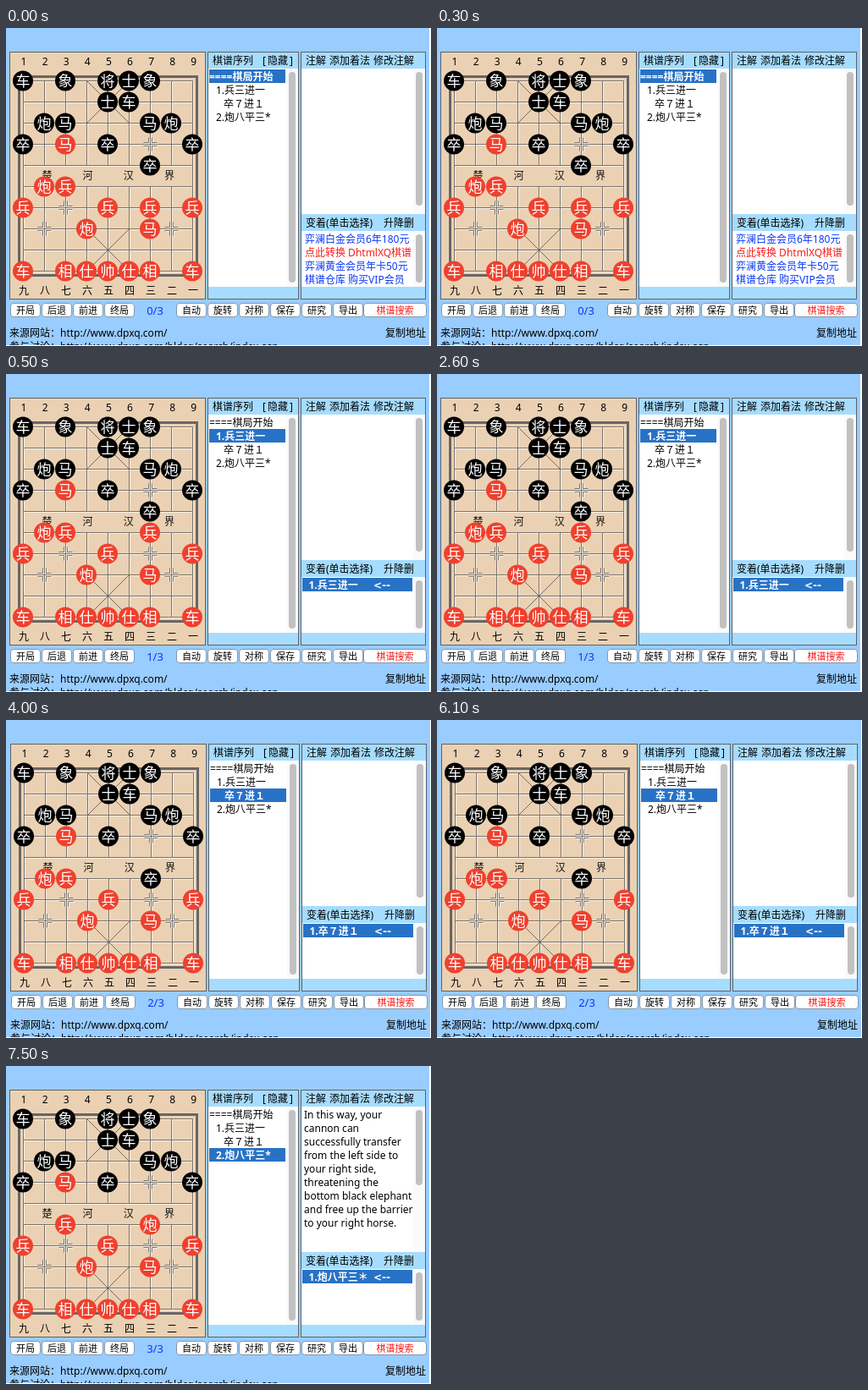
These frames come from a looping animation (502x376 px, 8 s). An HTML page:

```html
<!DOCTYPE html>
<html lang="zh-CN">
<head>
<meta charset="utf-8">
<title>象棋棋谱</title>
<style>
html, body { margin: 0; width: 100%; height: 100%; overflow: hidden; background: #fff; }
svg { display: block; width: 502px; height: 376px; }
text { font: 12px "Noto Sans", "Noto Sans CJK SC", "Noto Sans CJK", sans-serif; white-space: pre; }
.mid { text-anchor: middle; }
.bold { font-weight: bold; }
.arrow { font-family: "DejaVu Sans", sans-serif; font-weight: bold; }
.small { font-size: 11px; }
.count { font-size: 13px; }
.glyph { font-size: 17px; }
.state { visibility: hidden; animation: 8s step-end infinite; }
#s0 { animation-name: start; }
#s1 { animation-name: first; }
#s2 { animation-name: second; }
#s3 { animation-name: third; }
#scene { animation: nudge 8s step-end infinite; }
@keyframes start { 0% { visibility: visible } 6.25%, 100% { visibility: hidden } }
@keyframes first { 0% { visibility: hidden } 6.25% { visibility: visible } 50%, 100% { visibility: hidden } }
@keyframes second { 0% { visibility: hidden } 50% { visibility: visible } 93.75%, 100% { visibility: hidden } }
@keyframes third { 0% { visibility: hidden } 93.75%, 100% { visibility: visible } }
@keyframes nudge { 0% { transform: none } 50% { transform: translateX(1px) } 93.75%, 100% { transform: none } }
</style>
</head>
<body>
<svg viewBox="0 0 502 376"><g id="scene"></g><rect y="375" width="502" height="1" fill="#fff"/></svg>
<script>
const RED = '#f0402e', BLACK = '#000', BLUE = '#0838fa', LINK_RED = '#f81a1a';
const PICK = '#2872c6', HEAD = '#a6dcff', EDGE = '#5c6268';

const rect = (x, y, w, h, fill, extra = '') =>
  `<rect x="${x}" y="${y}" width="${w}" height="${h}" fill="${fill}" ${extra}/>`;
const text = (x, y, str, fill = BLACK, cls = '') =>
  `<text x="${x}" y="${y}" fill="${fill}" class="${cls}">${str.replace(/</g, '&lt;')}</text>`;
const path = (d, stroke) => `<path d="${d}" fill="none" stroke="${stroke}"/>`;
const panel = (x, w, fill) => rect(x + .5, 28.5, w - 1, 292, fill, `stroke="${EDGE}"`);
const colX = c => 20 + 25 * c;
const rowY = r => 62.5 + 25 * r;

// Each piece is written as glyph, column, row.
const pieces = (list, fill) => list.split(' ').map(([name, c, r]) =>
  `<circle cx="${colX(+c)}" cy="${rowY(+r)}" r="12" fill="${fill}"/>` +
  text(colX(+c), rowY(+r) + 6, name, '#fff', 'mid glyph')).join('');

function gridPath() {
  let d = '';
  for (let r = 0; r < 10; r++) d += `M20.5 ${rowY(r)}H220.5`;
  for (let c = 0; c < 9; c++) {
    d += c % 8 ? `M${colX(c) + .5} 62.5V162.5M${colX(c) + .5} 187.5V287.5` : `M${colX(c) + .5} 62.5V287.5`;
  }
  return d;
}

function starPath() {
  let d = '';
  const star = (c, r) => {
    for (const sx of [-1, 1]) {
      if (c + sx < 0 || c + sx > 8) continue;
      for (const sy of [-1, 1])
        d += `M${colX(c) + .5 + 2 * sx} ${rowY(r) + 8 * sy}v${-6 * sy}h${6 * sx}`;
    }
  };
  for (const r of [2, 7]) { star(1, r); star(7, r); }
  for (const r of [3, 6]) for (let c = 0; c < 9; c += 2) star(c, r);
  return d;
}

function board() {
  const grid = gridPath(), stars = starPath();
  const palace = 'M95.5 62.5l50 50m0-50l-50 50M95.5 237.5l50 50m0-50l-50 50';
  let out = panel(4, 232, '#ebd1b3');
  out += rect(15.5, 57.5, 210, 235, 'none', 'stroke="#666" stroke-width="3"');
  out += `<g transform="translate(1 1)">${path(grid + stars, '#fbf1e4')}</g>`;
  out += path(grid + stars, '#77736e') + path(palace, '#706b66');
  [...'楚河汉界'].forEach((s, i) => out += text(48.4 + 48.2 * i, 179, s, '#111', 'mid'));
  [...'九八七六五四三二一'].forEach((s, i) => {
    out += text(21 + 25.1 * i, 44, String(i + 1), BLACK, 'mid') + text(21 + 25 * i, 315, s, BLACK, 'mid');
  });
  out += pieces('车00 象20 将40 士50 象60 士41 车51 炮12 马22 马62 炮72 卒03 卒43 卒83', BLACK);
  return out + pieces('马23 兵25 兵06 兵46 兵86 炮37 马67 车09 相29 仕39 帅49 仕59 相69 车89', RED);
}

const track = (x, y, h) => rect(x, y, 14, h, '#fafafa');
const thumb = (x, y, h) => rect(x, y, 8, h, '#c1c1c1', 'rx="4"');

function sidePanels() {
  return panel(238, 108, HEAD) + rect(239, 48, 106, 258, '#fff') + track(331, 48, 258) + thumb(334, 52, 249) +
    text(244, 43, '棋谱序列') + text(303, 43, '[') + text(309, 43, '隐藏') + text(335, 43, ']') +
    panel(348, 148, HEAD) + rect(349, 48, 146, 172, '#fff') + track(481, 48, 172) +
    rect(349, 240, 146, 66, '#fff') + track(481, 240, 66) + thumb(484, 244, 57) +
    text(354, 43, '注解') + text(382, 43, '添加着法') + text(434, 43, '修改注解') +
    text(354, 235, '变着(单击选择)') + text(446, 235, '升降删');
}

function footer() {
  const button = (x, w, label, fill) =>
    rect(x + .5, 325.5, w - 1, 16, '#fff', 'rx="3.5" stroke="#8398ae"') +
    text(x + w / 2, 338, label, fill, 'mid small');
  let out = '';
  ['开局', '后退', '前进', '终局'].forEach((s, i) => out += button(5 + 37 * i, 36, s));
  ['自动', '旋转', '对称', '保存', '研究', '导出'].forEach((s, i) => out += button(201 + 37 * i, 36, s));
  return out + button(422, 75, '棋谱搜索', LINK_RED) +
    text(4, 365, '来源网站：') + text(64, 365, 'http://www.dpxq.com/') + text(448, 365, '复制地址') +
    text(4, 381, '参与讨论：') + text(64, 381, 'http://www.dpxq.com/hldcg/search/index.asp');
}

const moves = [[240, '====棋局开始'], [248, '1.兵三进一'], [257, '卒７进１'], [248, '2.炮八平三*']];
const links = ['弈澜白金会员6年180元', '点此转换 DhtmlXQ棋谱', '弈澜黄金会员年卡50元', '棋谱仓库 购买VIP会员'];
const note = ['In this way, your', 'cannon can', 'successfully transfer', 'from the left side to', 'your right side,',
  'threatening the', 'bottom black elephant', 'and free up the barrier', 'to your right horse.'];
const variants = ['', '1.兵三进一', '1.卒７进１', '1.炮八平三＊'];
const black = ['卒64', '卒64', '卒65', ''];
const red = ['炮15 兵66', '炮15 兵65', '炮15', '炮65'];

function state(n) {
  let out = pieces(red[n], RED) + (black[n] && pieces(black[n], BLACK));
  out += rect(240, 49 + 16 * n, 90, 16, PICK);
  moves.forEach(([x, s], i) => out += text(x, 62 + 16 * i, s, i === n ? '#fff' : BLACK, i === n ? 'bold' : ''));
  out += text(176, 339, n + '/3', BLUE, 'mid count') + thumb(484, 52, n === 3 ? 89 : 158);
  if (n === 0) {
    links.forEach((s, i) => out += text(353, 254 + 16 * i, s, i === 1 ? LINK_RED : BLUE));
  } else {
    out += rect(350, 241, 130, 16, PICK) + text(357.5, 254, variants[n], '#fff', 'bold') +
      text(434, 254, '<--', '#fff', 'arrow');
  }
  if (n === 3) note.forEach((s, i) => out += text(352, 62 + 16 * i, s));
  return `<g id="s${n}" class="state">${out}</g>`;
}

document.getElementById('scene').innerHTML =
  rect(-1, 0, 501, 375, '#99ccff') + board() + sidePanels() + footer() + [0, 1, 2, 3].map(state).join('');
</script>
</body>
</html>
```
